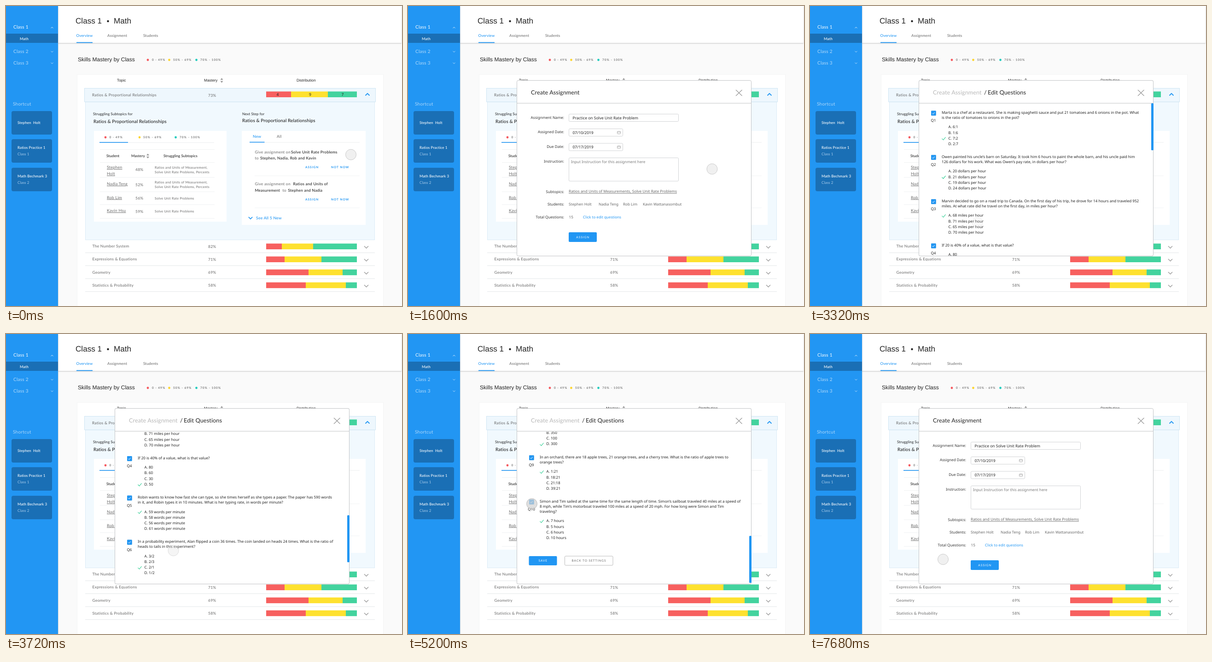
Write an HTML page that moves like this. It is 860 px wide and 651 px high and loops after 8 s.

```html
<!DOCTYPE html>
<html lang="en">
<head>
<meta charset="utf-8">
<title>Class dashboard</title>
<style>
html, body { margin: 0; width: 100%; height: 100%; overflow: hidden; background: #fafafa; }
svg { display: block; }
text { font-family: Lato, sans-serif; letter-spacing: .25px; text-rendering: geometricPrecision; }
.n { font-family: "Noto Sans", sans-serif; letter-spacing: 0; }
.h { font-family: "Liberation Sans", sans-serif; letter-spacing: 0; }
.c { letter-spacing: .1px; }
.w { letter-spacing: 1px; }
.b { font-weight: 700; }
.s { font-weight: 500; }
.u { text-decoration: underline; }
.e { text-anchor: end; }
.m { text-anchor: middle; }
</style>
</head>
<body>
<svg id="stage" width="860" height="651" viewBox="0 0 860 651"></svg>
<script>
const BLUE = '#2196f3', RED = '#f7605f', YELLOW = '#fee12f', GREEN = '#43d39e';
const DARK = '#222', GREY = '#666', PALE = '#ebeef0';

// y is the middle of the capitals
const text = (x, y, s, size = 8.5, fill = GREY, cls = '') =>
  `<text x="${x}" y="${y + size * .35}" font-size="${size}" fill="${fill}" class="${cls}">${s}</text>`;
const box = (x, y, w, h, fill, more = '') =>
  `<rect x="${x}" y="${y}" width="${w}" height="${h}" fill="${fill}" ${more}/>`;
const line = (x1, x2, y, color = PALE, w = 1) => box(x1, y - w / 2, x2 - x1, w, color);
const path = (d, color, w = 1) => `<path d="${d}" fill="none" stroke="${color}" stroke-width="${w}"/>`;
const chevron = (x, y, r, dir, color, w) =>
  path(`M${x - r} ${y - dir * r / 2}l${r} ${dir * r}l${r} ${-dir * r}`, color, w);
const tick = (x, y, k, color, w) => path(`M${x - 4 * k} ${y}l${3 * k} ${3 * k}l${5 * k} ${-6 * k}`, color, w);
const dot = (x, y, r, fill) => `<circle cx="${x}" cy="${y}" r="${r}" fill="${fill}"/>`;
const sort = (x, y) => `<path d="M${x - 3} ${y - 1}l3 -4l3 4zm0 2.5l3 4l3 -4z" fill="#999"/>`;
const outline = (c, r = 2) => `stroke="${c}" rx="${r}"`;

function sidebar() {
  const shortcut = (y, title, sub) => box(12, y, 88, 51, '#1a6fb5', 'rx="4"') +
    text(25, y + (sub ? 18.5 : 25), title, 8, '#fff', 'c s') + (sub ? text(25, y + 32, sub, 8, '#a9cdec', 'c') : '');
  return box(0, 0, 113, 651, BLUE, 'filter="url(#soft)"') +
    text(16, 45.5, 'Class 1', 10, '#fff') + chevron(100, 47, 2.5, -1, '#d9ecfc') +
    box(0, 60, 113, 20, '#1a6fb5') + text(30, 71, 'Math', 8, '#fff', 'c s') +
    text(16, 98, 'Class 2', 10, '#b5dbfa') + chevron(100, 99, 2.5, 1, '#b5dbfa') +
    text(16, 123.3, 'Class 3', 10, '#b5dbfa') + chevron(100, 124, 2.5, 1, '#b5dbfa') +
    text(15, 212, 'Shortcut', 10, '#acd6f9') +
    shortcut(228, 'Stephen&#160; Holt') + shortcut(289, 'Ratios Practice 1', 'Class 1') +
    shortcut(351, 'Math Bechmark 3', 'Class 2');
}

const legend = (y, dots, labels, r) => ['0 - 49%', '50% - 69%', '70% - 100%'].map((s, i) =>
  dot(dots[i], y, r, ['#f55a5f', '#fdd52f', '#22cbbd'][i]) + text(labels[i], y + .2, s, 6.5, '#777', 'w b')).join('');

const bar = (y, a, b) => box(565, y, a - 565, 12.5, RED) + box(a, y, b - a, 12.5, YELLOW) + box(b, y, 762 - b, 12.5, GREEN);

function page() {
  const row = (y, name, pct, a, b) => text(187.5, y, name) + text(439, y + .5, pct) +
    bar(y - 6, a, b) + chevron(782.5, y + 1.8, 4.5, 1, '#999', 1.3) + line(172, 801, y + 14, '#e3e7e9');
  return box(113, 0, 747, 651, '#fafafa') +
    box(154.5, 148.5, 665, 520, '#fff', 'stroke="#f4f5f5"') +
    box(113, 0, 746, 80, '#fff', 'filter="url(#soft)"') +
    text(151, 32.5, 'Class 1', 17.1, DARK, 'h') + dot(221.5, 33, 2.2, DARK) + text(234, 32.5, 'Math', 17.1, DARK, 'h') +
    text(152.5, 64, 'Overview', 8.2, BLUE, 'c s') + text(220, 64, 'Assignment', 8.2, GREY, 'c') +
    text(298, 64, 'Students', 8.2, GREY, 'c') + line(153, 188, 79.3, BLUE, 1.8) +
    text(156, 116, 'Skills Mastery by Class', 12.05, DARK, 'h') +
    legend(117, [308, 354.5, 413.5], [317, 363, 422], 2.4) +
    text(241, 161, 'Topic', 8.3, DARK, 'h') + text(430, 161, 'Mastery', 8.3, DARK, 'h') +
    sort(468.5, 161.3) + text(631, 161.3, 'Distribution', 8.3, DARK, 'h') +
    box(172.5, 208, 628, 299.5, '#f1f9fe', 'stroke="#dcecf6"') +
    box(170.5, 178.5, 632, 29.5, '#eef7fd', 'stroke="#cfe5f3"') +
    text(187, 193, 'Ratios &amp; Proportional Relationships') + text(439, 194, '73%') + bar(185.5, 619, 699) +
    text(590, 192.3, '4', 8.5, DARK, 'n m') + text(660.5, 192.3, '9', 8.5, DARK, 'n m') + text(731, 192.3, '7', 8.5, DARK, 'n m') +
    chevron(785, 192, 4.5, -1, BLUE, 1.8) +
    row(521.5, 'The Number System', '82%', 599, 667) + row(549.5, 'Expressions &amp; Equations', '71%', 605, 685) +
    row(577.7, 'Geometry', '69%', 657, 731) + row(605.7, 'Statistics &amp; Probability', '58%', 651, 738);
}

function struggling() {
  const student = (y, names, pct, topics) => names.map((s, i) => text(219, y + i * 14, s, 8.8, GREY, 'u')).join('') +
    text(281, y + (names[1] ? 5 : 2), pct) +
    topics.map((s, i) => text(323, y + (topics[1] ? i * 10 - (names[1] ? 0 : 4) : 1.5), s, 7.2)).join('');
  const pair = ['Ratios and Units of Measurement,', 'Solve Unit Rate Problems, Percents'];
  const single = ['Solve Unit Rate Problems'];
  return text(189, 234.5, 'Struggling Subtopics for', 8, DARK, 'c') +
    text(190, 250, 'Ratios &amp; Proportional Relationships', 10, DARK, 'c s') +
    box(191, 271, 288, 197, '#fff') +
    legend(285, [216, 290, 368.5], [224.5, 298, 377], 2.4) +
    line(203, 452, 296.5) + line(203, 265, 296, BLUE, 1.6) +
    [311.5, 339.5, 372, 403, 431, 461].map(y => line(204, 453, y, '#f0f2f3')).join('') +
    text(218, 325, 'Student', 8, DARK, 'c s') + text(272, 325, 'Mastery', 8, DARK, 'c s') + sort(308, 325.3) +
    text(342, 325, 'Struggling Subtopics', 8, DARK, 'c s') +
    student(350, ['Stephen', 'Holt'], '48%', pair) + student(386, ['Nadia Teng'], '52%', pair) +
    student(415.5, ['Rob Lim'], '56%', single) + student(444, ['Kavin Hsu'], '59%', single);
}

function nextStep() {
  const actions = y => text(650, y, 'ASSIGN', 6.5, BLUE, 'w b') + text(706, y, 'NOT NOW', 6.5, BLUE, 'w b');
  return text(513, 234, 'Next Step for', 8, DARK, 'c') +
    text(513, 248.5, 'Ratios &amp; Proportional Relationships', 10, DARK, 'c s') +
    box(512, 271, 269, 204, '#fff') +
    text(536, 283, 'New', 8.5, BLUE, 's') + text(588, 283, 'All') +
    line(529, 768, 296) + line(529, 561.5, 295.5, BLUE, 1.6) +
    text(540.5, 317, 'Give assignment on') + text(619, 317, 'Solve Unit Rate Problems', 8.5, DARK, 's') +
    text(540.5, 330.5, 'to') + text(552, 330.5, 'Stephen, Nadia, Rob and Kavin', 8.5, DARK, 's') + actions(350) +
    line(540, 768, 368.5, '#f2f4f5') +
    text(540.5, 386, 'Give assignment on') + text(623.5, 386, 'Ratios and Units of', 8.5, DARK, 's') +
    text(540.5, 400, 'Measurement', 8.5, DARK, 's') + text(600.5, 400, 'to') +
    text(612.5, 400, 'Stephen and Nadia', 8.5, DARK, 's') + actions(420) +
    line(540, 768, 438, '#f2f4f5') +
    chevron(531, 460, 4.2, 1, BLUE, 1.6) + text(543, 460, 'See All 5 New', 8.6, BLUE, 's');
}

const frame = () => box(236.5, 161.5, 509, 381, '#fff', outline('#c2c4c6', 3)) + line(237, 745, 211, '#c2c4c6') +
  path('M712 182l13.5 13M725.5 182l-13.5 13', '#999', 1.2);

function settings() {
  const label = (y, s) => text(339, y, s, 8.13, '#333', 'n e');
  const field = (y, w, h, s, fill = DARK, x = 357.5, size = 8.5) =>
    box(349.5, y, w, h, '#fff', outline('#d2d4d6')) + text(x, y + 8.2, s, size, fill, 'n');
  const calendar = y => box(454.5, y - 2.5, 7, 5.5, '#fff', outline('#aaa', 1)) + line(454.5, 461.5, y - .5, '#aaa', .8);
  return frame() + text(267, 188, 'Create Assignment', 12.6, DARK, 'c') +
    label(242, 'Assignment Name:') + field(234.5, 238, 16, 'Practice on Solve Unit Rate Problem') +
    label(273.5, 'Assigned Date:') + field(266.5, 117, 16, '07/10/2019') + calendar(274.5) +
    label(305, 'Due Date:') + field(298, 117, 16, '07/17/2019') + calendar(306) +
    label(337, 'Instruction:') +
    field(329.5, 238, 50.5, 'Input Instruction for this assignment here', '#777', 354, 8.2) +
    label(403, 'Subtopics:') +
    text(349, 402.5, 'Ratios and Units of Measurements, Solve Unit Rate Problems', 8.25, GREY, 'n u') +
    label(430.5, 'Students:') +
    [[349, 'Stephen Holt'], [414, 'Nadia Teng'], [467, 'Rob Lim'], [510, 'Kavin Wattanasombut']]
      .map(([x, s]) => text(x, 430, s, 8.13, GREY, 'n')).join('') +
    label(458, 'Total Questions:') + text(349.5, 458, '15', 8.13, GREY, 'n') +
    text(380, 458, 'Click to edit questions', 8.06, BLUE, 'n s') +
    box(349, 491, 61, 21, BLUE, 'rx="2"') + text(379.8, 501.8, 'ASSIGN', 6.5, '#fff', 'w m');
}

// title lines, answers, index of the right answer
const per = (unit, ...values) => values.map(v => `${v} ${unit}`);
const questions = [
  [['Marta is a chef at a restaurant. She is making spaghetti sauce and put 21 tomatoes and 6 onions in the pot. What',
    'is the ratio of tomatoes to onions in the pot?'], ['6:1', '1:6', '7:2', '2:7'], 2],
  [['Owen painted his uncle’s barn on Saturday. It took him 6 hours to paint the whole barn, and his uncle paid him',
    '126 dollars for his work. What was Owen’s pay rate, in dollars per hour?'], per('dollars per hour', 20, 21, 19, 24), 1],
  [['Marvin decided to go on a road trip to Canada. On the first day of his trip, he drove for 14 hours and traveled 952',
    'miles. At what rate did he travel on the first day, in miles per hour?'], per('miles per hour', 68, 71, 65, 70), 0],
  [['If 20 is 40% of a value, what is that value?'], [80, 60, 30, 50], 3],
  [['Robin wants to know how fast she can type, so she times herself as she types a paper. The paper has 590 words',
    'in it, and Robin types it in 10 minutes. What is her typing rate, in words per minute?'], per('words per minute', 59, 58, 56, 61), 0],
  [['In a probability experiment, Alan flipped a coin 36 times. The coin landed on heads 24 times. What is the ratio of',
    'heads to tails in this experiment?'], ['3/2', '2/3', '2/1', '1/2'], 2],
  [['If 20 is 50% of a value, what is that value?'], [10, 40, 30, 50], 1],
  [['What value is equal to 60% of 500?'], [250, 350, 100, 300], 3],
  [['In an orchard, there are 18 apple trees, 21 orange trees, and a cherry tree. What is the ratio of apple trees to',
    'orange trees?'], ['1:21', '18:21', '21:18', '39:21'], 0],
  [['Simon and Tim sailed at the same time for the same length of time. Simon’s sailboat traveled 40 miles at a speed of',
    '8 mph, while Tim’s motorboat traveled 100 miles at a speed of 20 mph. For how long were Simon and Tim',
    'traveling?'], per('hours', 7, 5, 6, 10), 0]
];
const SCROLL = 700.5;

function editor() {
  let y = 232.5, out = '';
  questions.forEach(([title, answers, right], i) => {
    out += box(263.5, y - 4.8, 9.8, 9.8, '#fff', outline('#bbb', 1)) + tick(268, y + .3, .65, '#999') +
      `<g id="check${i + 1}">` + box(263, y - 5.3, 10.6, 10.6, BLUE, 'rx="1"') + tick(268, y + .3, .65, '#fff') + '</g>' +
      text(268, y + 16, 'Q' + (i + 1), 8.1, DARK, 'n m');
    title.forEach((s, k) => out += text(286, y - 1.5 + k * 11, s, 8.1, DARK, 'n'));
    answers.forEach((s, k) => {
      const ay = y + 8 + title.length * 11 + k * 12.2;
      out += text(300.5, ay, 'ABCD'[k] + '. ' + s, 8.1, DARK, 'n');
      if (k === right) out += tick(290.5, ay + .8, 1, GREEN, 1.2);
    });
    y += 75 + 10.5 * title.length;
  });
  const by = 482 + SCROLL;
  out += box(262.5, by, 61, 20, BLUE, 'rx="2"') + text(293.3, by + 10.2, 'SAVE', 6.5, '#fff', 'w m') +
    box(340.5, by, 104.5, 20, '#fff', outline('#bbb')) + text(393, by + 10.2, 'BACK TO SETTINGS', 6.5, GREY, 'w m');
  return frame() + text(267, 188, 'Create Assignment', 12.6, '#b8b8b8', 'c') + text(378, 188, '/', 12.6, DARK, 'c') +
    text(386, 188, 'Edit Questions', 12.7, DARK, 'c') +
    `<g clip-path="url(#view)"><g id="list">${out}</g></g>` +
    box(741, 211, 5, 102, BLUE, 'rx="1.5" id="thumb"');
}

stage.innerHTML = `<defs>
  <filter id="soft" x="-10%" y="-10%" width="120%" height="120%"><feDropShadow dx="0" dy="1" stdDeviation="1.8" flood-opacity=".22"/></filter>
  <clipPath id="view"><rect x="237" y="212" width="509" height="330"/></clipPath></defs>` +
  page() + struggling() + nextStep() + sidebar() +
  `<g id="settings">${settings()}</g><g id="editor">${editor()}</g>
  <g id="cursor"><circle id="idle" r="11.5" fill="#e1e1e1" fill-opacity=".5" stroke="#b4b4b4" stroke-opacity=".65"/>
  <circle id="press" r="11.5" fill="#d2d2d2" fill-opacity=".7" stroke="#aaa" stroke-opacity=".7"/></g>`;

const $ = id => document.getElementById(id);
const ramp = (t, a, b) => Math.min(1, Math.max(0, (t - a) / (b - a)));
const inOut = p => p < .5 ? 4 * p ** 3 : 1 - 4 * (1 - p) ** 3;

// cubic-bezier(.25, .1, .25, 1)
function ease(p) {
  let lo = 0, hi = 1;
  const curve = (s, a, b) => 3 * (1 - s) ** 2 * s * a + 3 * (1 - s) * s * s * b + s ** 3;
  for (let i = 0; i < 20; i++) {
    const mid = (lo + hi) / 2;
    if (curve(mid, .25, .25) < p) lo = mid; else hi = mid;
  }
  return curve(hi, .1, 1);
}

// start, end, x, y
const moves = [
  [10, 750, 667, 351], [1568, 2400, 378, 469], [2439, 2440, 401, 462], [3170, 3320, 363.5, 470],
  [4290, 5120, 269, 368.5], [5850, 6440, 305, 489], [6839, 6840, 289, 489]
];
// press start, fully down, release start, released
const presses = [[760, 800, 959, 960], [2420, 2460, 2580, 2760], [5130, 5200, 5420, 5720], [6810, 6840, 6960, 7400]];

function draw(t) {
  let x = 749, y = 322.5;
  for (const [a, b, tx, ty] of moves) {
    if (t <= a) break;
    const p = t >= b ? 1 : ease(ramp(t, a, b));
    x += (tx - x) * p;
    y += (ty - y) * p;
  }
  const down = presses.reduce((sum, [a, b, c, d]) => sum + ramp(t, a, b) - ramp(t, c, d), 0);
  $('cursor').setAttribute('transform', `translate(${x} ${y})`);
  $('cursor').setAttribute('opacity', 1 - .65 * (ramp(t, 3170, 3320) - ramp(t, 3540, 3920)));
  $('idle').setAttribute('opacity', 1 - down);
  $('press').setAttribute('opacity', down);

  const edit = ramp(t, 2580, 3040) - ramp(t, 6940, 7680);
  const unchecked = ramp(t, 5420, 5720);
  $('settings').setAttribute('visibility', t >= 960 ? 'visible' : 'hidden');
  $('editor').setAttribute('visibility', edit > 0 ? 'visible' : 'hidden');
  $('editor').setAttribute('opacity', edit);
  $('list').setAttribute('transform', `translate(0 ${-SCROLL * inOut(ramp(t, 3560, 3918))})`);
  $('thumb').setAttribute('y', 211 + 227 * ease(ramp(t, 3520, 3920)));
  $('thumb').setAttribute('opacity', 1 - unchecked);
  $('check10').setAttribute('opacity', 1 - unchecked);
}

// the picture advances 25 times a second
const STEP = 40, LOOP = 8000;
const start = performance.now();
function run() {
  draw(Math.floor((performance.now() - start) % LOOP / STEP) * STEP);
  requestAnimationFrame(run);
}
run();
</script>
</body>
</html>
```
